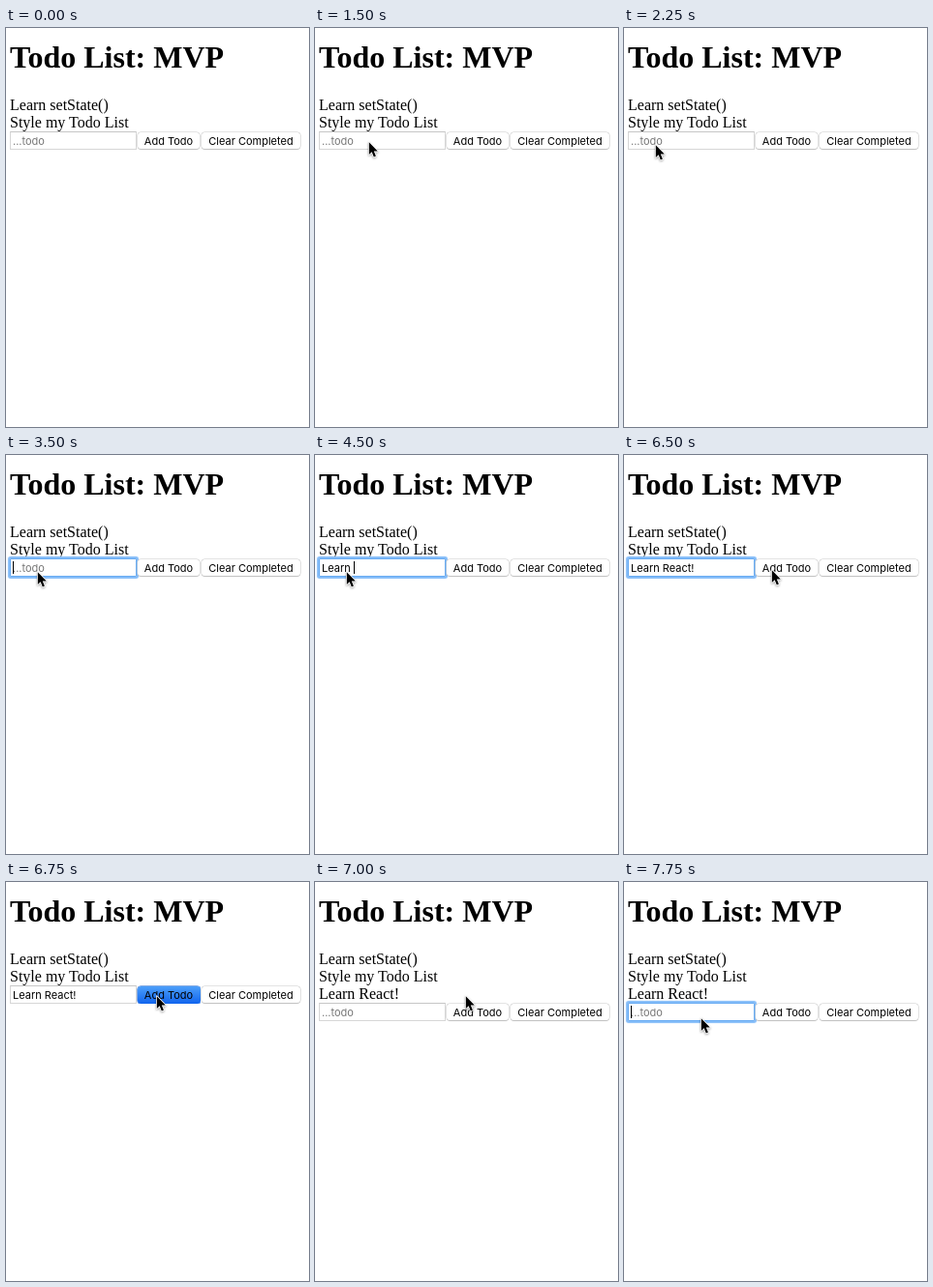
Write an HTML page that moves like this. It is 313 px wide and 413 px high and loops after 8000 ms.

```html
<!DOCTYPE html>
<html lang="en">
<head>
<meta charset="utf-8">
<title>Todo List</title>
<style>
  html, body { margin: 0; width: 100%; height: 100%; overflow: hidden; background: #fff; }
  .stage { position: relative; width: 313px; height: 413px; overflow: hidden; color: #000; }
  .stage div, .stage svg { position: absolute; white-space: pre; }

  /* every moving part shares one 8 s clock with hard steps */
  .anim { animation: 8s step-end infinite; }

  .title { left: 4px; top: 12px; font: bold 32px/36px "Liberation Serif", serif; }
  .item { left: 4px; font: 16px/17px "Liberation Serif", serif; }

  .row { left: 0; top: 0; width: 313px; height: 150px; font: 11px/14px Inter, sans-serif; animation-name: drop; }
  .field { left: 4px; top: 107px; width: 131px; height: 19px; box-sizing: border-box;
    border: 1px solid #d6d6d6; border-top-color: #c6c6c6; background: #fff; }
  .ring { left: 4px; top: 107px; width: 131px; height: 19px; box-sizing: border-box;
    border: 1px solid #69acf3; border-radius: 1px; box-shadow: 0 0 1px 2px #83bcf9; animation-name: focus; }
  .text { left: 7px; top: 110px; }
  .hint { color: #777; animation-name: hint; }
  .typed { animation-name: typed; }
  .typed span { font-size: 0; animation: key 8s step-end var(--at) infinite; }
  .caret { display: inline-block; width: 1px; height: 13px; margin-right: -1px;
    vertical-align: top; background: #000; }
  .typed .caret { animation-name: caret-end; }
  .start { left: 7px; top: 110px; animation-name: caret-start; }

  .btn { top: 108px; height: 18px; text-align: center; line-height: 14px; }
  .btn .face, .btn .press { left: 1px; right: 1px; top: 0; bottom: 1px; border-radius: 3.5px; }
  .btn .face { background: #fff; box-shadow: 0 0 0 .5px #c9c9c9, 0 .8px .8px #a4a4a4; }
  .btn .press { left: .5px; right: .5px; bottom: .5px;
    background: linear-gradient(#4c9ffa, #1064ee); box-shadow: 0 0 0 .5px #2a74e4; animation-name: press; }
  .btn .label { left: 0; right: 0; top: 2px; }
  .add { left: 135px; width: 66px; }
  .clear { left: 201px; width: 104px; }

  .new { animation-name: added; }
  .pointer { left: 0; top: 0; overflow: visible; filter: drop-shadow(0 1px .8px rgba(0, 0, 0, .35));
    animation-name: pointer; }

  @keyframes drop { 0% { top: 0; } 87.5%, 100% { top: 18px; } }
  @keyframes added { 0% { opacity: 0; } 87.5%, 100% { opacity: 1; } }
  @keyframes hint { 0% { opacity: 1; } 50% { opacity: 0; } 87.5%, 100% { opacity: 1; } }
  @keyframes typed { 0% { opacity: 0; } 50% { opacity: 1; } 87.5%, 100% { opacity: 0; } }
  @keyframes focus { 0% { opacity: 0; } 31.25% { opacity: 1; } 84.375% { opacity: 0; } 96.875%, 100% { opacity: 1; } }
  @keyframes press { 0% { opacity: 0; } 84.375% { opacity: 1; } 87.5%, 100% { opacity: 0; } }
  @keyframes caret-start {
    0% { opacity: 0; } 31.25% { opacity: 1; } 37.5% { opacity: 0; }
    43.75% { opacity: 1; } 50% { opacity: 0; } 96.875%, 100% { opacity: 1; }
  }
  @keyframes caret-end { 0% { opacity: 1; } 81.25%, 100% { opacity: 0; } }
  /* each piece stays 3 s; the typed line is hidden before it collapses */
  @keyframes key { 0% { font-size: 11px; } 37.5%, 100% { font-size: 0; } }
  @keyframes pointer {
    0% { transform: translate(-40px, 147px); }
    6.25% { transform: translate(22px, 147px); }
    9.375% { transform: translate(48px, 128px); }
    12.5% { transform: translate(56px, 118px); }
    18.75% { transform: translate(55px, 118px); }
    25% { transform: translate(38px, 116px); }
    28.125% { transform: translate(32px, 121px); }
    78.125% { transform: translate(120px, 119px); }
    81.25% { transform: translate(152px, 119px); }
    84.375% { transform: translate(155px, 118px); }
    90.625% { transform: translate(91px, 134px); }
    93.75%, 100% { transform: translate(79px, 141px); }
  }
</style>
</head>
<body>
<div class="stage">
  <div class="title">Todo List: MVP</div>
  <div class="item" style="top:71px">Learn setState()</div>
  <div class="item" style="top:89px">Style my Todo List</div>
  <div class="item new anim" style="top:107px">Learn React!</div>

  <div class="row anim">
    <div class="field"></div>
    <div class="ring anim"></div>
    <div class="text hint anim">...todo</div>
    <div class="text typed anim"><span style="--at:4s">L</span><span style="--at:4.25s">ear</span><span style="--at:4.5s">n </span><span style="--at:4.75s">R</span><span style="--at:5s">eac</span><span style="--at:5.25s">t</span><span style="--at:5.75s">!</span><i class="caret anim"></i></div>
    <div class="caret start anim"></div>
    <div class="btn add">
      <div class="face"></div>
      <div class="press anim"></div>
      <div class="label">Add Todo</div>
    </div>
    <div class="btn clear">
      <div class="face"></div>
      <div class="label">Clear Completed</div>
    </div>
  </div>

  <svg class="pointer anim" width="12" height="18">
    <path d="M.8 .2V13L3.7 10.3 5.8 15.4 7.9 14.5 5.8 9.6H9.8Z" fill="#000"
      stroke="#fff" stroke-width="1.6" stroke-linejoin="round" paint-order="stroke"/>
  </svg>
</div>
</body>
</html>
```
